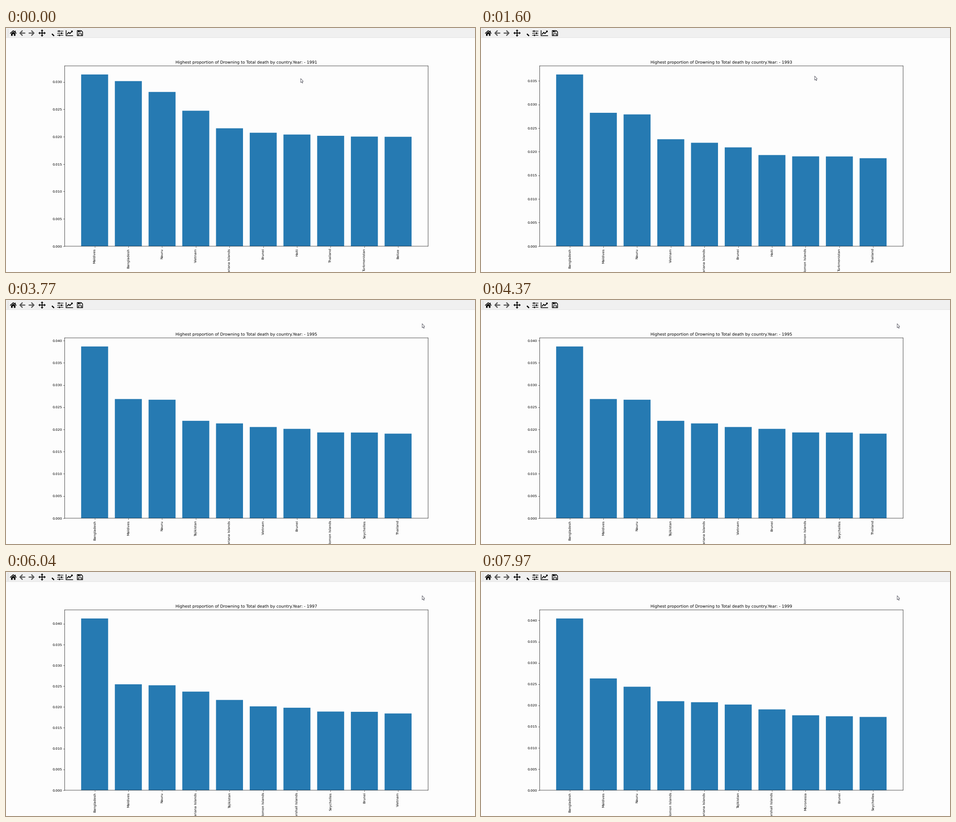
These frames come from a looping animation (1035 px wide and 541 px high, 8 s). A matplotlib script:

```python
import numpy as np
import matplotlib.pyplot as plt
from matplotlib.animation import FuncAnimation
from matplotlib.patches import Circle, Polygon, Rectangle
from matplotlib.ticker import FormatStrFormatter, MultipleLocator

W, H = 1035, 541
DPI = 72                      # one point equals one pixel
FRAMES, INTERVAL = 160, 50
FIRST_YEAR, FIRST_CHANGE, YEAR_MS = 1991, 300, 1040
TOP_COUNT = 10
TOOLBAR_H = 21.7
PAPER, TOOLBAR, BAR = "#fdfdfd", "#f0f0f0", "#267ab2"

plt.rcParams.update({
    "font.family": "DejaVu Sans",
    "text.hinting": "none",
    "path.snap": False,
    "toolbar": "None",
})

# Trend of each country: (years since the first, deaths per 100,000 deaths),
# straight between the points. Ranking and axis scale follow from these.
TRENDS = {
    "Bangladesh": [(0, 3016), (2, 3635), (3, 3737), (4, 3868), (5, 4045),
                   (6, 4126), (8, 4047)],
    "Maldives": [(0, 3137), (2, 2824), (6, 2545), (8, 2634)],
    "Nauru": [(0, 2818), (3, 2776), (5, 2562), (8, 2439)],
    "Vietnam": [(0, 2475), (8, 1634)],
    "Northern Mariana Islands": [(0, 2154), (3, 2208), (5, 2063), (6, 2369),
                                 (8, 2074)],
    "Brunei": [(0, 2073), (3, 2102), (4, 2013), (5, 2025), (6, 1884),
               (8, 1743)],
    "Haiti": [(0, 2040), (8, 1600)],
    "Thailand": [(0, 2017), (2, 1863), (4, 1905), (8, 1700)],
    "Turkmenistan": [(0, 2003), (8, 1591)],
    "Belize": [(0, 1999), (8, 1400)],
    "Tajikistan": [(2, 1850), (3, 2161), (4, 2194), (5, 2073), (6, 2169),
                   (8, 2019)],
    "Solomon Islands": [(0, 1872), (4, 1932), (8, 2098)],
    "Seychelles": [(2, 1800), (3, 1923), (4, 1930), (6, 1890), (8, 1727)],
    "Marshall Islands": [(5, 1800), (6, 1982), (8, 1905)],
    "Micronesia": [(6, 1800), (8, 1766)],
}


def ranking(year):
    """Names and rates of the leading countries, highest first."""
    rates = {name: np.interp(year, *zip(*points)) * 1e-5
             for name, points in TRENDS.items()}
    names = sorted(rates, key=rates.get, reverse=True)[:TOP_COUNT]
    return names, [rates[name] for name in names]


fig = plt.figure(figsize=(W / DPI, H / DPI), dpi=DPI, facecolor=PAPER)

# Bar chart in the area below the toolbar.
plot_h = H - TOOLBAR_H
ax = fig.add_axes([0.125, 0.11 * plot_h / H, 0.775, 0.77 * plot_h / H],
                  facecolor=PAPER)
bars = ax.bar(range(TOP_COUNT), np.ones(TOP_COUNT), color=BAR)
ax.set_xlim(-0.89, 9.89)
ax.set_xticks(range(TOP_COUNT))
ax.tick_params(labelsize=7.49, length=2.6, width=0.6, pad=2.6)
ax.tick_params(axis="x", labelrotation=90)
ax.yaxis.set_major_locator(MultipleLocator(0.005))
ax.yaxis.set_major_formatter(FormatStrFormatter("%.3f"))
for spine in ax.spines.values():
    spine.set_linewidth(0.7)
title = ax.set_title("", fontsize=8.99, pad=4.5)

# Pixel-space layer for the toolbar and the pointer.
ui = fig.add_axes([0, 0, 1, 1], zorder=5)
ui.set_xlim(0, W)
ui.set_ylim(H, 0)
ui.axis("off")


def stroke(points, width, color="black"):
    x, y = zip(*points)
    ui.plot(x, y, color=color, lw=width, solid_capstyle="butt",
            solid_joinstyle="miter")


def fill(points, color="black"):
    ui.add_patch(Polygon(points, fc=color, ec="none", zorder=2))


def box(x, y, w, h, color="black"):
    ui.add_patch(Rectangle((x, y), w, h, fc=color, ec="none", zorder=2))


def home_icon():
    stroke([(9, 12.2), (16, 6), (23, 12.2)], 1.6)
    fill([(11.2, 12.4), (16, 8.2), (20.8, 12.4), (20.8, 17.4), (17.4, 17.4),
          (17.4, 13.4), (14.6, 13.4), (14.6, 17.4), (11.2, 17.4)])
    box(19.3, 6, 1.9, 4)


def arrow_icon(cx, side):
    stroke([(cx - side * 6, 11.3), (cx + side * 5, 11.3)], 2.4, "#555555")
    stroke([(cx, 5.6), (cx + side * 5.5, 11.3), (cx, 17)], 2.4, "#555555")


def move_icon(cx, cy):
    for dx, dy in ((1, 0), (-1, 0), (0, 1), (0, -1)):
        stroke([(cx, cy), (cx + 6 * dx, cy + 6 * dy)], 1.9)
        fill([(cx + 8 * dx, cy + 8 * dy),
              (cx + 4.8 * dx + 3 * dy, cy + 4.8 * dy + 3 * dx),
              (cx + 4.8 * dx - 3 * dy, cy + 4.8 * dy - 3 * dx)])


def zoom_icon():
    ui.add_patch(Circle((98.3, 9.8), 4.5, fc="none", ec="black", lw=2))
    stroke([(101.4, 13), (106, 17.6)], 2.6)


def sliders_icon():
    for y, knob in ((7, 117), (11.6, 122.6), (16.2, 118)):
        box(113, y - 0.6, 13.5, 1.2)
        box(knob - 2, y - 0.7, 4, 1.4, TOOLBAR)
        box(knob - 1.4, y - 1.7, 2.8, 3.4)


def chart_icon():
    stroke([(132.6, 5), (132.6, 17), (148, 17)], 1.5)
    stroke([(134.6, 14), (138.5, 9.8), (141, 12.3), (145.8, 7.4)], 1.9)
    fill([(143, 5.8), (147.2, 5.8), (147.2, 10)])


def save_icon():
    stroke([(157.4, 5.7), (166, 5.7), (169, 8.7), (169, 17), (157.4, 17),
            (157.4, 5)], 1.5)
    box(159, 5.5, 6.2, 4)
    box(162.6, 6.2, 1.4, 2.4, TOOLBAR)
    stroke([(159.9, 17), (159.9, 12.6), (166.6, 12.6), (166.6, 17)], 1.3)


box(0, 0, W, TOOLBAR_H, TOOLBAR)
box(0, 21, W, 0.8, "#dedede")
box(4, 2, 0.8, 18, "#cccccc")
box(68, 3, 0.6, 16, "#e6e6e6")
home_icon()
arrow_icon(36.5, -1)
arrow_icon(56, 1)
move_icon(79.6, 11.2)
zoom_icon()
sliders_icon()
chart_icon()
save_icon()

POINTER = np.array([(0, 0), (0, 9), (2, 7.2), (3.4, 10.2), (4.8, 9.6),
                    (3.5, 6.7), (5.8, 6.4)])
pointer = ui.add_patch(Polygon(POINTER, fc="white", ec="#444450", lw=0.8,
                               zorder=3))


def ease(t, start, end):
    u = np.clip((t - start) / (end - start), 0, 1)
    return u * u * (3 - 2 * u)


def pointer_tip(t):
    first, second = ease(t, 250, 1100), ease(t, 1650, 2250)
    return np.array([650.3 + 86 * first + 182 * second,
                     112 - 5.5 * first - 54 * second])


def show_year(year):
    names, rates = ranking(year)
    for bar, rate in zip(bars, rates):
        bar.set_height(rate)
    ax.set_ylim(0, 1.05 * rates[0])
    ax.set_xticklabels(names)
    title.set_text("Highest proportion of Drowning to Total death by country."
                   f"Year: - {FIRST_YEAR + year}")


def update(frame):
    t = frame * INTERVAL
    show_year(max(0, 1 + (t - FIRST_CHANGE) // YEAR_MS))
    pointer.set_xy(POINTER + pointer_tip(t))
    return ()


anim = FuncAnimation(fig, update, frames=FRAMES, interval=INTERVAL,
                     init_func=lambda: update(0), repeat=True, repeat_delay=0,
                     cache_frame_data=False)
plt.show()
```
